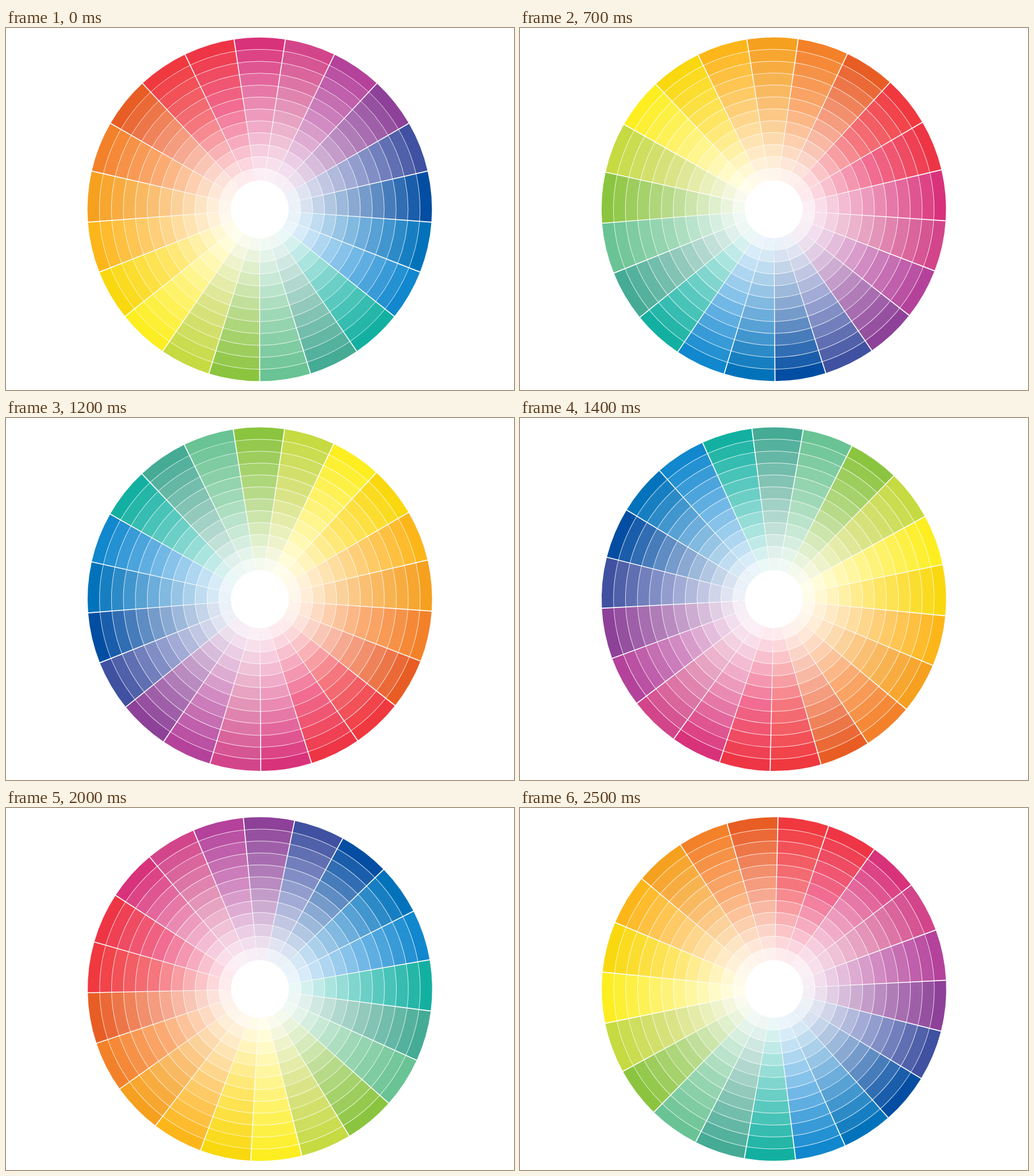
An HTML page with a canvas for the animation above (2.6 s loop, 840 by 600 pixels).

```html
<!DOCTYPE html>
<html lang="en">
<head>
<meta charset="utf-8">
<title>Colour wheel</title>
<style>
  html, body { margin: 0; width: 100%; height: 100%; overflow: hidden; background: #fff; }
  canvas { display: block; }
</style>
</head>
<body>
<canvas id="stage" width="840" height="600"></canvas>
<script>
const ctx = document.getElementById('stage').getContext('2d');

const CX = 419.5, CY = 300.5, DRIFT = 0.5;
const R = 284.8, HOLE = 48;
const RINGS = 12, STEP = (R - HOLE) / RINGS;
const FRAME = 100, LOOP = 2600, LAST = LOOP / FRAME - 1;
const MID = 5;

// Clockwise from the top: rim colour and the tint at ring MID
const SECTORS = [
  ['d8327b', 'ea8ab2'], ['d3458a', 'e394b8'], ['b4429b', 'd18bc2'],
  ['8d4198', 'b98bc0'], ['3f51a0', '929dce'], ['034ea2', '759bcb'],
  ['0273ba', '6caddb'], ['1187cd', '72b8e6'], ['13b0a1', '6bcfc6'],
  ['45ab95', '92c9bb'], ['69c394', '9fd8b6'], ['8bc53f', 'b7da89'],
  ['c6da42', 'dae487'], ['fdee21', 'fef37a'], ['f9d80f', 'fee562'],
  ['fdb61a', 'fecf78'], ['f6a01f', 'fabf72'], ['f3812a', 'fbab72'],
  ['e85d24', 'f59b7e'], ['f0383f', 'f5767d'], ['ee3545', 'f16c90']
];
const ARC = 2 * Math.PI / SECTORS.length;

// [frame index, clockwise turn in degrees]
const TURNS = [[0, 0], [4, 35.37], [10, 135.25], [14, 206.97], [16, 244.87], [20, 311.62], [25, 404.2]];

const rgb = hex => [0, 2, 4].map(i => parseInt(hex.slice(i, i + 2), 16));
const mix = (a, b, t) => a.map((v, i) => v + (b[i] - v) * t);
const WHITE = [255, 255, 255];

const tints = SECTORS.map(pair => {
  const [rim, mid] = pair.map(rgb);
  return Array.from({ length: RINGS }, (_, k) => {
    const c = k < MID ? mix(rim, mid, k / MID) : mix(mid, WHITE, (k - MID) / (RINGS - MID));
    return `rgb(${c.map(Math.round)})`;
  });
});

function turnAt(n) {
  let i = 1;
  while (TURNS[i][0] < n) i++;
  const [n0, a0] = TURNS[i - 1], [n1, a1] = TURNS[i];
  return a0 + (a1 - a0) * (n - n0) / (n1 - n0);
}

function disc(r) {
  ctx.beginPath();
  ctx.arc(0, 0, r, 0, 2 * Math.PI);
}

function wedge(r, from, to, fill) {
  ctx.beginPath();
  ctx.moveTo(0, 0);
  ctx.arc(0, 0, r, from, to);
  ctx.closePath();
  ctx.fillStyle = fill;
  ctx.fill();
}

// White divider, slightly wider towards the rim
function spoke(angle) {
  ctx.save();
  ctx.rotate(angle);
  ctx.beginPath();
  ctx.moveTo(HOLE, -0.4);
  ctx.lineTo(R + 1, -0.85);
  ctx.lineTo(R + 1, 0.85);
  ctx.lineTo(HOLE, 0.4);
  ctx.fill();
  ctx.restore();
}

function draw(n) {
  const shift = DRIFT * n / LAST;
  ctx.setTransform(1, 0, 0, 1, 0, 0);
  ctx.fillStyle = '#fff';
  ctx.fillRect(0, 0, 840, 600);
  ctx.translate(CX + shift, CY - shift);
  ctx.rotate(turnAt(n) * Math.PI / 180 - Math.PI / 2);

  tints.forEach((rings, s) => {
    const from = (s - 0.5) * ARC;
    rings.forEach((fill, k) => wedge(R - k * STEP, from, from + ARC, fill));
  });

  ctx.strokeStyle = 'rgba(255,255,255,0.75)';
  ctx.lineWidth = 1;
  for (let k = 1; k < RINGS; k++) {
    disc(R - k * STEP);
    ctx.stroke();
  }

  ctx.fillStyle = '#fff';
  tints.forEach((_, s) => spoke((s - 0.5) * ARC));
  disc(HOLE);
  ctx.fill();
}

let shown = -1;
function tick() {
  const n = Math.floor(performance.now() % LOOP / FRAME);
  if (n !== shown) {
    shown = n;
    draw(n);
  }
  requestAnimationFrame(tick);
}
tick();
</script>
</body>
</html>
```
